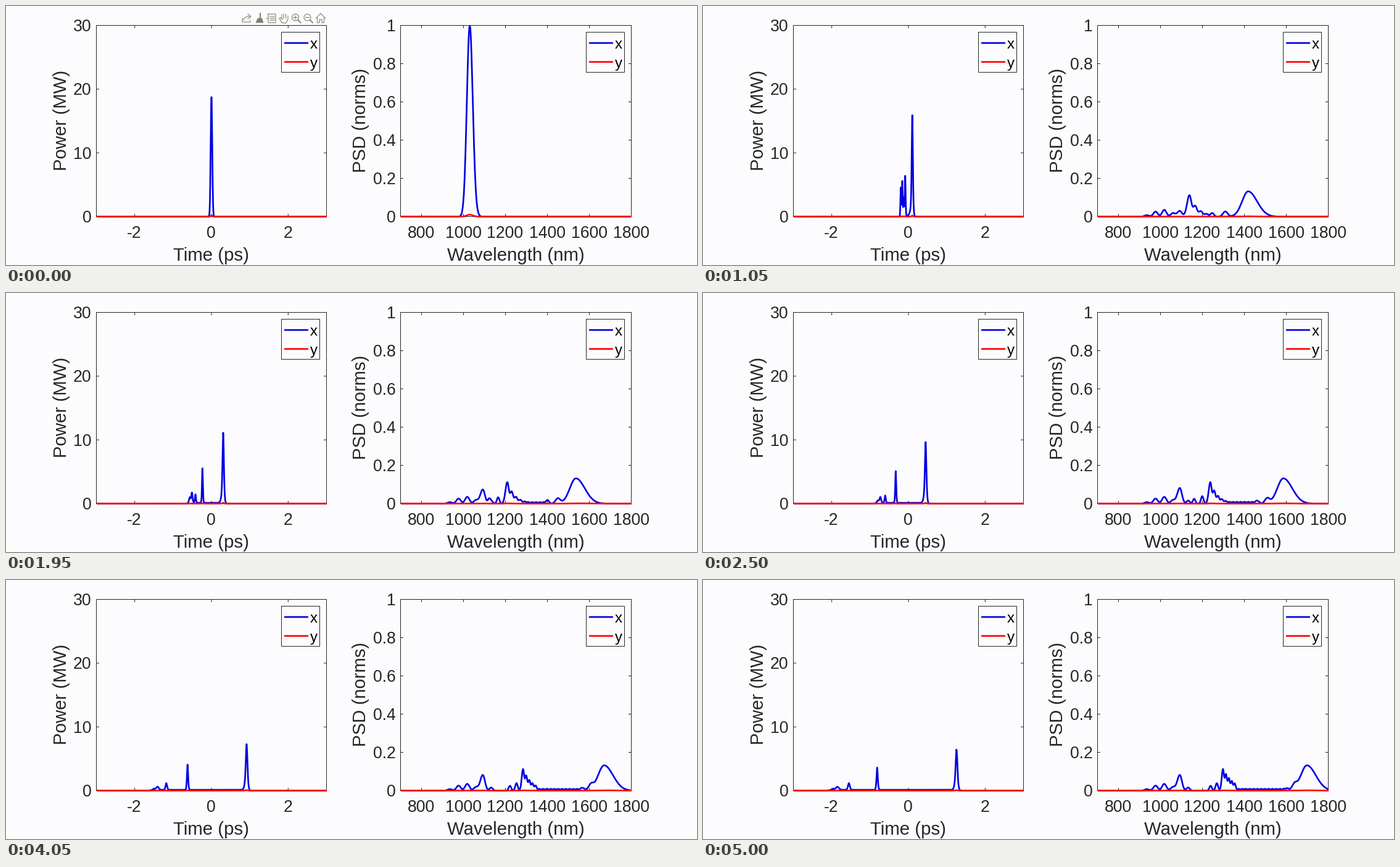
A matplotlib script that plays this animation: 1120x420 px, repeating every 5.05 s.

```python
import numpy as np
import matplotlib.pyplot as plt
from matplotlib.animation import FuncAnimation
from matplotlib.patches import Rectangle, Circle, Polygon

plt.rcParams["font.family"] = "Liberation Sans"

W, H, DPI = 1120, 420, 80
PT = 72 / DPI                      # points per pixel
FRAMES, INTERVAL = 101, 50
PAPER, INK, BLUE, RED = "#fcfcfe", "#262626", "#0000e0", "#ff0000"
TOP, BASE = 31.5, 341.5

fig = plt.figure(figsize=(W / DPI, H / DPI), dpi=DPI, facecolor=PAPER)
ax = fig.add_axes([0, 0, 1, 1])
ax.set_xlim(0, W)
ax.set_ylim(H, 0)
ax.axis("off")


def stroke(xs, ys, color=INK, width=1.0, **kw):
    return ax.plot(xs, ys, color=color, lw=width * PT, snap=False, **kw)[0]


def box(x, y, w, h, fill="none", z=1):
    ax.add_patch(Rectangle((x, y), w, h, fc=fill, ec=INK, lw=PT, snap=False, zorder=z))


def label(x, y, text, size, ha="center", color=INK, angle=0, z=3):
    ax.text(x, y, text, fontsize=size * PT, ha=ha, va="baseline", color=color,
            rotation=angle, rotation_mode="anchor", zorder=z)


class Panel:
    """A boxed plot with a blue and a red curve, in pixel coordinates."""

    def __init__(self, left, right, xlim, ymax, xticks, yticks, xlabel, ylabel, ylabel_x):
        self.left, self.right = left, right
        self.x0, self.scale = xlim[0], (right - left) / (xlim[1] - xlim[0])
        self.ymax = ymax
        box(left, TOP, right - left, BASE - TOP)
        for v in xticks:
            x = self.px(v)
            stroke([x, x], [BASE, BASE - 4])
            stroke([x, x], [TOP, TOP + 4])
            label(x - 0.5, 376, f"{v:g}", 26.67)
        for v in yticks:
            y = self.py(v)
            stroke([left, left + 4], [y, y])
            stroke([right, right - 4], [y, y])
            label(left - 8, y + 9.5, f"{v:g}", 26.67, ha="right")
        label((left + right) / 2 - 0.5, 413, xlabel, 29.33)
        label(ylabel_x, (TOP + BASE) / 2 - 1.5, ylabel, 29.33, angle=90)

        clip = Rectangle((left, TOP - 0.5), right - left, BASE - TOP + 1.8,
                         transform=ax.transData)
        self.curves = []
        for color, z in ((BLUE, 3), (RED, 4)):
            line = stroke([], [], color, 2.67, zorder=z, solid_joinstyle="round")
            line.set_clip_path(clip)
            self.curves.append(line)
        self.legend()

    def px(self, v):
        return self.left + (v - self.x0) * self.scale

    def py(self, v):
        return BASE - v * (BASE - TOP) / self.ymax

    def legend(self):
        x = self.right - 73
        box(x, 42.5, 62, 65, PAPER, 5)
        for y, color, name in ((60, BLUE, "x"), (90.7, RED, "y")):
            stroke([x + 4.5, x + 43.5], [y, y], color, 2.67, zorder=6,
                   solid_capstyle="butt")
            label(x + 46.5, y + 9, name, 24, "left", "black", z=6)

    def show(self, xs, ys):
        for line, gain in zip(self.curves, (1, 0.01)):
            line.set_data(self.px(xs), self.py(gain * ys))


def toolbar():
    """Small plot-tool icons above the left panel."""
    c = "#80806a"
    parts = []

    def pen(xs, ys, width=1.1):
        parts.append(stroke(xs, ys, c, width))

    def patch(p):
        parts.append(ax.add_patch(p))

    # export
    pen([384, 383, 383, 396, 396], [20, 20, 26, 26, 23])
    pen([385, 387, 391, 396], [23, 19, 17, 17])
    pen([392, 397, 392], [13, 17, 21])
    # brush
    pen([412, 412], [12, 20], 2)
    patch(Polygon([(408, 20), (415, 20), (417, 27), (405, 27)], fc=c, ec=c, lw=0.5))
    # data tip
    pen([425, 437, 437, 425, 425], [13, 13, 27, 27, 13])
    for y in (17, 20, 23):
        pen([428, 435], [y, y])
    pen([422, 425], [20, 20])
    # hand
    pen([446, 443, 445, 448], [25, 20, 19, 22])
    pen([446, 448, 454, 457], [25, 27.5, 27.5, 21])
    for x, y in ((447, 14), (450, 12.5), (453.5, 13), (457, 16)):
        pen([x, x], [y, 20])
    # zoom in, zoom out
    for x in (469, 488.5):
        patch(Circle((x, 18.5), 5.5, fill=False, ec=c, lw=1.1 * PT))
        pen([x + 4, x + 8.5], [22.5, 27], 1.8)
        pen([x - 3, x + 3], [18.5, 18.5])
    pen([469, 469], [15.5, 21.5])
    # home
    pen([502, 510, 518], [20, 12, 20])
    pen([504.5, 504.5, 508, 508, 512, 512, 515.5, 515.5],
        [19, 27, 27, 22, 22, 27, 27, 19])
    return parts


power = Panel(146.5, 519.5, (-3, 3), 30, (-2, 0, 2), (0, 10, 20, 30),
              "Time (ps)", "Power (MW)", 97.5)
psd = Panel(639.5, 1013.5, (700, 1800), 1, range(800, 1801, 200),
            (0, 0.2, 0.4, 0.6, 0.8, 1), "Wavelength (nm)", "PSD (norms)", 583)
icons = toolbar()

T = np.linspace(-3, 3, 1501)
LAM = np.linspace(700, 1800, 551)
PUMP = 1030          # nm
PULSE = 0.0235       # half width of the input pulse, ps
SPLIT = 21           # frame by which the pulse has broken up


def ramp(f, a, b):
    u = np.clip((f - a) / (b - a), 0, 1)
    return u * u * (3 - 2 * u)


def mix(a, b, s):
    return a + (b - a) * s


def sech2(x, center, hwhm):
    return 1 / np.cosh(np.clip(0.8814 * (x - center) / hwhm, -40, 40)) ** 2


def bell(x, center, left, right=None):
    return np.exp2(-((x - center) / np.where(x < center, left, right or left)) ** 2)


def leader(f):
    """Time, peak power and half width of the strongest soliton."""
    u, age = f - SPLIT, max(f, 6) / SPLIT
    split = ramp(f, 6, 20)
    burst = np.exp(-((f - 10) / 3.5) ** 2)
    delay = max(0, 0.10 + 0.0105 * u + 5.2e-5 * u * u) if f > 10 else 0
    peak = mix(18.75, 15.8 * age ** -0.59, split) + 18 * burst
    width = mix(PULSE, 0.018 * age ** 0.28, split) / (1 + 0.7 * burst)
    return delay, peak, width


# Pulses left behind: lasting power, decaying power, decay in frames
TRAILING = ((1.5, 4.8, 90), (1.05, 1.8, 10), (0.45, 5.0, 12), (0.15, 4.4, 10))


def power_at(f):
    t0, peak, width = leader(f)
    y = peak * mix(bell(T, t0, width), sech2(T, t0, width), ramp(f, 4, 10))
    grow = ramp(f, 7, 17)
    spread = np.clip((f - 7) / (SPLIT - 7), 0, 1)
    y += 0.04 * peak * grow * sech2(T, t0 - 0.05, 0.03)
    u = max(f - SPLIT, 0)
    for k, (rest, extra, decay) in enumerate(TRAILING):
        speed = 0.0204 - 0.0123 * 0.37 ** k
        t = -spread * (0.085 + 0.038 * k + speed * u * (1 + 0.0018 * u))
        height = rest + extra * np.exp(-u / decay)
        y += grow * height * sech2(T, t, 0.011 + 1e-4 * u * 2 ** k)
    y += 0.12 * grow * ((T > t) & (T < t0))
    return y


# Self-phase-modulated pump, as a Fourier sum over the pulse
tau = np.linspace(-0.15, 0.15, 301)
gauss = bell(tau, 0, PULSE)
omega = 2 * np.pi * 299792.458 * (1 / LAM - 1 / PUMP)
kernel = np.exp(1j * np.outer(omega, tau))


def pump(f):
    field = np.sqrt(gauss) * np.exp(0.45j * f * gauss)
    return np.abs(kernel @ field) ** 2 / np.sum(np.sqrt(gauss)) ** 2


def bands(f):
    """Yield centre, height and half widths of every spectral band."""
    u = max(f - SPLIT, 0)
    late = ramp(f, SPLIT, 45)

    # steady bands around the pump
    for c in 935 + 41.5 * np.arange(4):
        yield c, 0.036 * np.exp(-((c - 1010) / 60) ** 2), 12, 12
    yield 1092, mix(0.03, 0.082, late), 14, 12
    yield 1132, 0.016 * late, 9, 9

    # second soliton with its comb of fringes
    second = 1138 + 180 * (1 - np.exp(-u / 36))
    step = 13 + 14 * np.exp(-u / 30)
    for k in range(5):
        yield (second + k * step, 0.112 * (0.5 + 0.0033 * u) ** k,
               (0.4 if k else 0.5) * step, 0.4 * step)
    for k in (1, 2):
        yield second - 2.1 * k * step, 0.06 * 0.65 ** k * late, 7, 7

    # red-shifting soliton and its side lobes
    first = 1418 + 325 * (1 - np.exp(-u / 40))
    gap = 55 + 54 * np.exp(-u / 32)
    for k in range(2):
        yield first - gap * (1 + 0.57 * k), 0.027 * 0.43 ** k, 13 - 4 * k, 13 - 4 * k
    yield first, 0.132, 34, 50

    # weak ripple between both groups
    lo, hi = second + 4 * step, first - 1.57 * gap
    for c in np.arange(lo + 18, hi, 18):
        yield c, 0.009 * late, 7, 7


def spectrum_at(f):
    y = pump(f) * (1 - ramp(f, 7, 16))
    grow = ramp(f, 6, 17)
    shift = np.clip((f - 5) / (SPLIT - 5), 0, 1) ** 0.45
    for center, height, left, right in bands(f):
        y += grow * height * bell(LAM, mix(PUMP, center, shift), left, right)
    return y


def draw(f):
    power.show(T, power_at(f))
    psd.show(LAM, spectrum_at(f))
    for icon in icons:
        icon.set_visible(f == 0)
    return power.curves + psd.curves + icons


anim = FuncAnimation(fig, draw, frames=FRAMES, interval=INTERVAL, repeat=True,
                     repeat_delay=0, blit=False)
plt.show()
```
